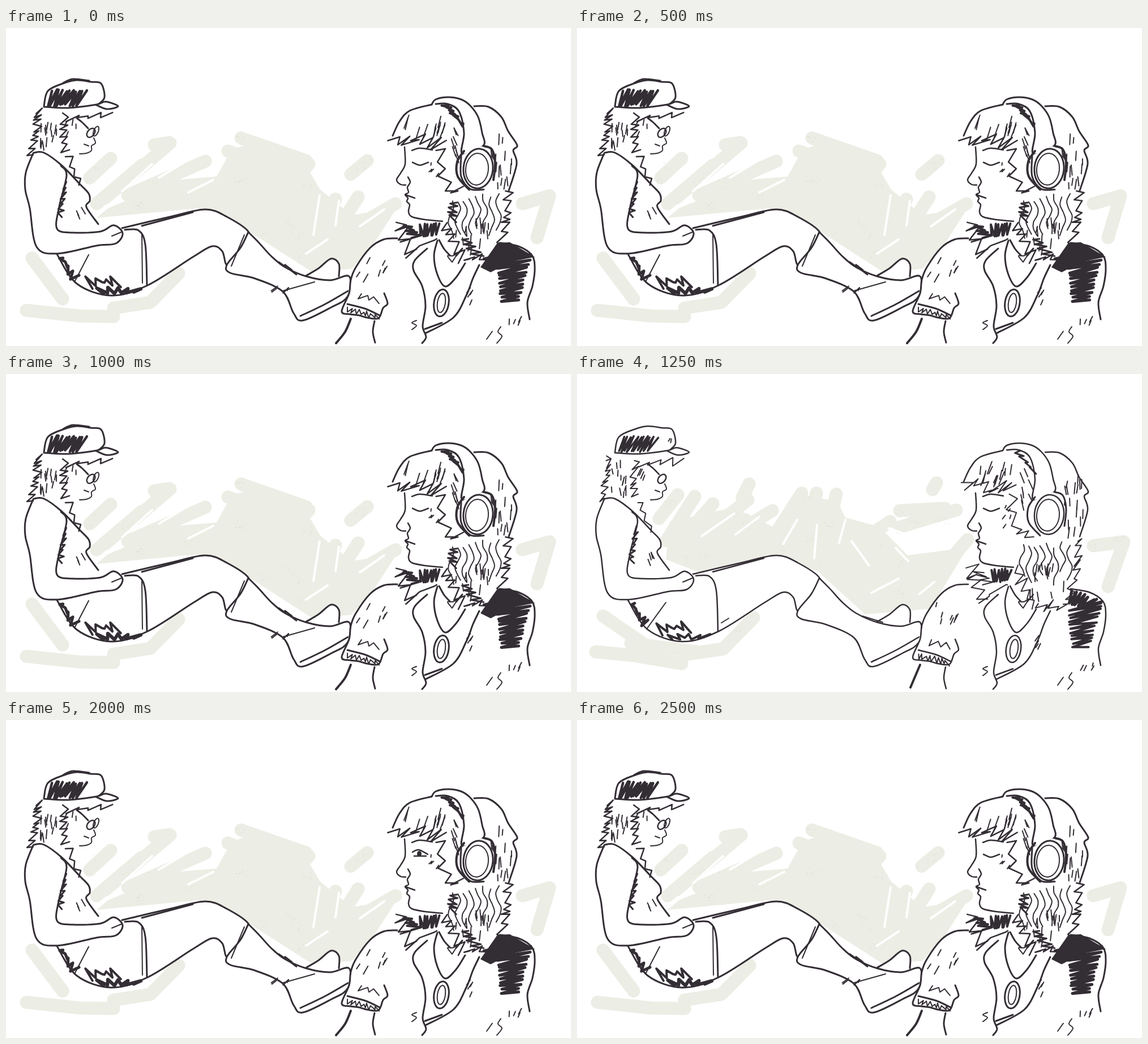
An HTML page with a canvas that plays this animation: 998 by 561 pixels, repeating every 2.75 s.

```html
<!DOCTYPE html>
<html lang="en">
<head>
<meta charset="utf-8">
<title>Two listeners</title>
<style>
html, body { margin: 0; width: 100%; height: 100%; overflow: hidden; background: #fff; }
canvas { display: block; width: 100vw; height: 100vh; }
</style>
</head>
<body>
<canvas id="stage" width="998" height="561"></canvas>
<script>
const W = 998, H = 561, BEAT = 250, BEATS = 11;
const INK = '#332d34', WASH = '#ecede4';
let g, seed, pen;

const random = () => (seed = (seed * 16807) % 2147483647) / 2147483647;
const jitter = n => (random() - 0.5) * n;
const lines = text => text.split('/').map(l => l.trim().split(' ').map(p => p.split(',').map(Number)));

function trace(p, smooth) {
  g.moveTo(...p[0]);
  for (let i = 1; i < p.length; i++) {
    const a = p[i - 1], b = p[i];
    if (!smooth) { g.lineTo(...b); continue; }
    const before = p[i - 2] || a, after = p[i + 1] || b;
    g.bezierCurveTo(a[0] + (b[0] - before[0]) / 6, a[1] + (b[1] - before[1]) / 6,
      b[0] - (after[0] - a[0]) / 6, b[1] - (after[1] - a[1]) / 6, ...b);
  }
}
function stroke(paths, smooth, width = pen, color = INK) {
  g.strokeStyle = color;
  g.lineWidth = width;
  g.beginPath();
  for (const path of paths) trace(path, smooth);
  g.stroke();
}
const ink = (text, width) => stroke(lines(text), true, width);
function fill(text, color = '#fff', smooth = false) {
  g.fillStyle = color;
  g.beginPath();
  for (const path of lines(text)) trace(path, smooth);
  g.fill();
}
function shape(text) {
  fill(text, '#fff', true);
  ink(text);
}
function ring(x, y, rx, ry, turn = 0.1, width = pen) {
  g.strokeStyle = INK;
  g.lineWidth = width;
  g.beginPath();
  g.ellipse(x, y, rx, ry, turn, 0, 7);
  g.stroke();
}
function along(path, n) {
  return Array.from({ length: n + 1 }, (_, i) => {
    const t = i / n * (path.length - 1), k = Math.min(Math.floor(t), path.length - 2);
    return [0, 1].map(c => path[k][c] + (path[k + 1][c] - path[k][c]) * (t - k));
  });
}
// Zigzag shading between two edges
function hatch(n, text, width = 4) {
  const [a, b] = lines(text).map(edge => along(edge, n));
  const zigzag = a.map((p, i) => (i % 2 ? p : b[i]).map(v => v + jitter(4)));
  stroke([zigzag], false, width);
}
// Ragged hair edge: locks lean downwards and alternate in length
function locks(n, size, text) {
  for (const path of lines(text)) {
    const edge = along(path, n).map(([x, y], i) =>
      [x + (i % 2 ? 1 : -1) * size * (0.3 + random() * 0.5), y + jitter(size) + (i % 2 ? -size / 3 : size / 3)]);
    stroke([edge], false, pen - 0.5);
  }
}
// Short flicks scattered in an ellipse
function flicks(n, x, y, rx, ry, length = 16, lean = 0) {
  for (let i = 0; i < n; i++) {
    const a = random() * 7, r = Math.sqrt(random());
    const px = x + Math.cos(a) * r * rx, py = y + Math.sin(a) * r * ry, l = length * (0.5 + random() / 2);
    stroke([[[px, py], [px + jitter(6) + lean * l, py + l]]], true, 2);
  }
}
function curl(x, y, length) {
  const points = Array.from({ length: 6 }, (_, i) => [x + Math.sin(i * 1.5 + x) * 5, y + length * i / 5]);
  stroke([points], true, 2);
}
function wash(mass, strokes, gaps) {
  fill(mass, WASH);
  stroke(lines(strokes), false, 23, WASH);
  stroke(lines(gaps), false, 4, '#fff');
  g.globalCompositeOperation = 'multiply';
  for (let i = 0; i < 70; i++) {
    const x = 30 + random() * 930, y = 190 + random() * 320;
    if (g.getImageData(x, y, 1, 1).data[3] === 0) continue;
    for (let k = 0; k < 16; k++) {
      g.fillStyle = `rgba(200,203,190,${random() * 0.3})`;
      g.fillRect(x + jitter(20), y + jitter(16), 1 + random() * 2, 1);
    }
  }
  g.globalCompositeOperation = 'source-over';
}

const washA = () => wash(
  '160,335 180,318 300,268 372,262 398,215 440,200 520,226 555,285 610,330 690,318 650,380 610,425 540,430 400,340 340,318',
  '148,264 185,230 / 160,310 240,242 / 175,300 290,203 / 215,295 352,235 / 415,194 530,234 / 392,217 480,250 / 500,280 535,240 / 565,330 582,302 / 618,350 688,310 / 609,258 638,234 / 262,206 288,202 / 595,340 622,298 / 912,310 960,296 938,370 / 46,406 100,478 / 36,498 130,508 190,509 / 190,494 255,484 305,433',
  '205,288 258,240 / 270,264 320,234 / 322,290 366,268 / 543,365 554,295 / 582,348 588,305 / 530,398 568,373 / 625,350 668,320');

const washB = () => wash(
  '157,327 164,260 265,238 300,246 350,272 381,248 396,212 460,225 474,253 535,270 584,320 690,306 625,414 509,424 425,348 350,320 215,350',
  '145,255 178,213 / 158,294 208,216 / 178,300 240,229 / 199,303 302,222 / 218,318 345,241 / 292,218 304,194 / 339,300 397,210 / 400,315 423,210 / 432,318 458,212 / 500,296 553,260 / 570,241 650,237 / 570,270 670,240 / 628,204 635,192 / 640,350 690,292 / 912,303 966,296 938,375 / 46,427 116,475 / 33,490 95,496 185,511 / 95,475 210,490 / 190,495 258,485 312,430',
  '220,286 278,246 / 280,283 322,252 / 364,300 389,257 / 419,325 424,266 / 463,298 474,257 / 516,338 485,295 / 520,386 568,361 / 585,330 563,307 / 550,272 584,284 / 605,388 631,367');

function sitter(second) {
  fill('50,145 42,222 122,232 130,222 150,218 158,202 156,188 164,145');
  fill('50,218 95,238 131,277 146,292 142,315 165,348 205,355 90,399 40,320 34,260');

  // Legs, shorts and boots
  shape('205,353 290,333 352,320 390,333 429,361 414,388 391,418 382,394 364,385 330,404 250,454 186,472 125,451 90,399');
  ink('210,356 234,357 246,382 249,454 / 240,349 330,325');
  shape('530,437 552,424 574,407 588,416 588,438');
  shape('428,360 446,378 469,403 493,422 530,438 572,445 606,438 603,474 574,493 524,516 508,503 489,465 440,442 396,432 390,418 414,388 428,360');
  ink('520,508 562,488 604,464');
  hatch(9, '92,402 127,436 / 101,404 115,448', 5);
  hatch(9, '134,436 203,458 / 152,460 190,436');
  hatch(10, '150,459 246,459 / 170,467 225,466', second ? 4 : 6);
  if (second) ink('123,450 133,436 157,403 / 255,439 268,431 / 504,427 540,438', 2);
  else {
    ink('122,446 146,400 / 240,365 241,450 / 421,365 398,420 / 488,464 545,448', 2);
    hatch(6, '476,408 508,430 / 486,418 512,433', 3);
    flicks(5, 485, 458, 16, 5, 9, -1);
  }

  // Torso and arm
  ink('49,220 67,220 98,242 131,276 146,292 148,305 142,316 163,346');
  shape('48,221 35,255 34,285 42,318 54,386 91,398 160,384 194,380 206,362 190,348 167,359 118,361 90,354 94,315 107,260 97,243');
  hatch(12, '102,280 91,330 / 107,270 99,332', 3);
  flicks(second ? 4 : 3, 128, 322, 10, 8, 14, 0.5);
  ink('187,367 204,360', 2);

  // Head
  locks(17, 10, '57,144 55,180 43,222');
  locks(11, 10, '106,150 99,188 105,220');
  locks(7, 10, '112,158 146,156 184,154');
  locks(6, 8, '110,222 118,250 134,278');
  flicks(13, 74, 180, 16, 34);
  flicks(4, 115, 172, 9, 14, 14, -0.3);
  shape('67,138 74,111 103,97 125,92 150,95 168,98 174,122 164,134');
  shape('67,139 110,141 160,135 176,130 198,138 178,143 160,136');
  hatch(20, '70,136 126,136 / 83,110 142,112', second ? 3.5 : 4.5);
  if (second) flicks(2, 165, 114, 2, 1, 8);
  else ink('101,97 118,90 147,93');
  ink('125,159 134,166 145,177');
  ring(150, 185, 6, 9, 0.7, 2.5);
  if (!second) ring(159, 182, 4, 9, 0.4, 2);
  ink('155,194 158,203 151,208 151,216 142,221 130,222 / 138,205 146,208', 2);
}

function listener(second, open) {
  fill('690,370 640,390 618,420 594,502 605,512 590,560 930,560 934,420 870,380 740,340');
  fill('685,200 712,147 752,133 800,122 860,142 902,207 898,270 890,340 860,412 808,410 775,345 739,338 714,330 707,300 690,268 705,240');

  // Blouse and arms
  ink('691,371 667,373 643,388 618,422 609,444 606,468 593,500 608,505 624,507 638,511 658,512 666,494 674,486 668,468 / 603,487 634,495 660,507');
  hatch(15, '598,501 658,514 / 604,494 655,505', 2);
  ink(second ? '606,513 589,553' : '609,513 599,536 583,556', 4);
  ink('651,517 648,536 652,555');
  ink('744,389 722,410 720,428 735,455 741,490 736,526 742,545 735,556 / 740,539 790,511 813,472 825,441 836,418 / 740,531 770,520');
  ink('725,516 717,520 725,525 717,532 / 874,527 869,536 876,544 867,556 / 859,535 849,549', 2);
  hatch(5, '614,478 660,484 / 628,470 656,474', 2);
  flicks(7, 648, 420, 26, 24, 14, -0.5);
  flicks(4, 822, 468, 10, 12, 10, -0.6);
  flicks(4, 903, 513, 14, 5, 10, -0.3);
  ink('872,379 905,385 929,401 934,424 930,455 921,484 925,514');
  hatch(22, '868,415 876,485 / 928,401 904,480', second ? 4 : 5);
  if (second) hatch(14, '869,404 902,412 / 875,382 926,402', 5);
  else fill('838,422 868,379 890,378 934,404 893,412 856,431', INK);

  // Necklaces
  ink('762,375 756,402 762,435 776,456 795,440 811,415 / 765,374 774,390 784,401 / 795,402 806,389');
  ink('788,413 780,402 789,402 797,398 788,413', 2);
  ring(second ? 771 : 769, 485, 13, 24, 0.15);
  ring(second ? 772 : 769, 485, 7, 17, 0.15, 2);

  // Face
  ink('704,210 705,240 697,256 690,268 697,276 706,277 / 710,263 714,272 709,281 711,290 705,294 710,300 708,306 713,312 711,324 717,333 740,338 771,341 / 705,294 722,300 / 717,216 731,212 753,215', 2.5);
  if (open) {
    ink('718,233 729,229 745,237 / 721,240 742,240', 2.5);
    ring(730, 236, 2, 3, 0, 4);
  } else ink('718,237 731,242 746,237', 2.5);
  flicks(5, 755, 245, 14, 26, 7, -0.7);

  // Hair
  ink('752,135 713,146 695,165 683,190 / 827,138 852,139 875,157 887,182 903,207 896,216 902,240 888,287');
  locks(13, 16, '684,194 712,198 745,200 766,204');
  locks(9, 13, '768,206 768,250 782,284 802,289');
  flicks(13, 740, 165, 38, 17, 24, -0.3);
  flicks(8, 790, 195, 9, 34, 18, 0.3);
  flicks(18, 876, 220, 20, 58, 20);
  locks(15, 11, '889,286 884,325 882,355 864,405');
  locks(9, 14, '864,405 838,410 810,408');
  locks(9, 12, '808,408 788,372 775,342');
  for (let i = 0; i < 8; i++) curl(786 + i * 12, 292 + random() * 16, 48 + random() * 22);
  flicks(15, 828, 362, 35, 32, 20);
  locks(9, 16, '697,340 702,366 714,398');
  locks(4, 10, '714,398 736,383 768,372');
  hatch(13, '730,346 766,345 / 734,366 760,364');
  hatch(7, '698,345 715,370 / 717,350 736,370', second ? 2 : 4);
  if (!second) {
    hatch(8, '783,306 782,334 / 797,306 795,342', 3);
    hatch(8, '801,370 823,402 / 816,370 844,404', 3);
  }

  // Headphones
  shape('752,135 759,126 781,122 804,126 820,137 834,157 841,185 843,208 806,222 809,185 800,147 780,134 759,134');
  hatch(second ? 8 : 15, '768,133 806,168 / 782,135 810,176', second ? 3 : 4);
  fill('803,225 797,255 815,283 840,287 860,268 863,235 843,208');
  ring(834, 248, 26, 35);
  ring(832, 249, 20, 28, 0.1, 2);
  ink('809,217 797,236 798,262 818,285 / 843,208 858,214 864,238 861,268', second ? 3 : 4);
  if (!second) ink('804,226 804,262 820,284 844,285');
}

function render(second, open) {
  const sheet = document.createElement('canvas');
  sheet.width = W;
  sheet.height = H;
  g = sheet.getContext('2d', { willReadFrequently: true });
  g.lineCap = g.lineJoin = 'round';
  seed = second ? 4211 : 7103;
  pen = second ? 2.5 : 3;
  (second ? washB : washA)();
  sitter(second);
  listener(second, open);
  return sheet;
}

const sheets = [false, true].map(second => [false, true].map(open => render(second, open)));
const stage = document.getElementById('stage').getContext('2d');

function play(now) {
  const beat = Math.floor(now / BEAT) % BEATS;
  const eyesOpen = beat >= 6 && beat <= 8;
  stage.fillStyle = '#fff';
  stage.fillRect(0, 0, W, H);
  stage.drawImage(sheets[beat % 2][+eyesOpen], 0, 0);
  requestAnimationFrame(play);
}
play(performance.now());
</script>
</body>
</html>
```
